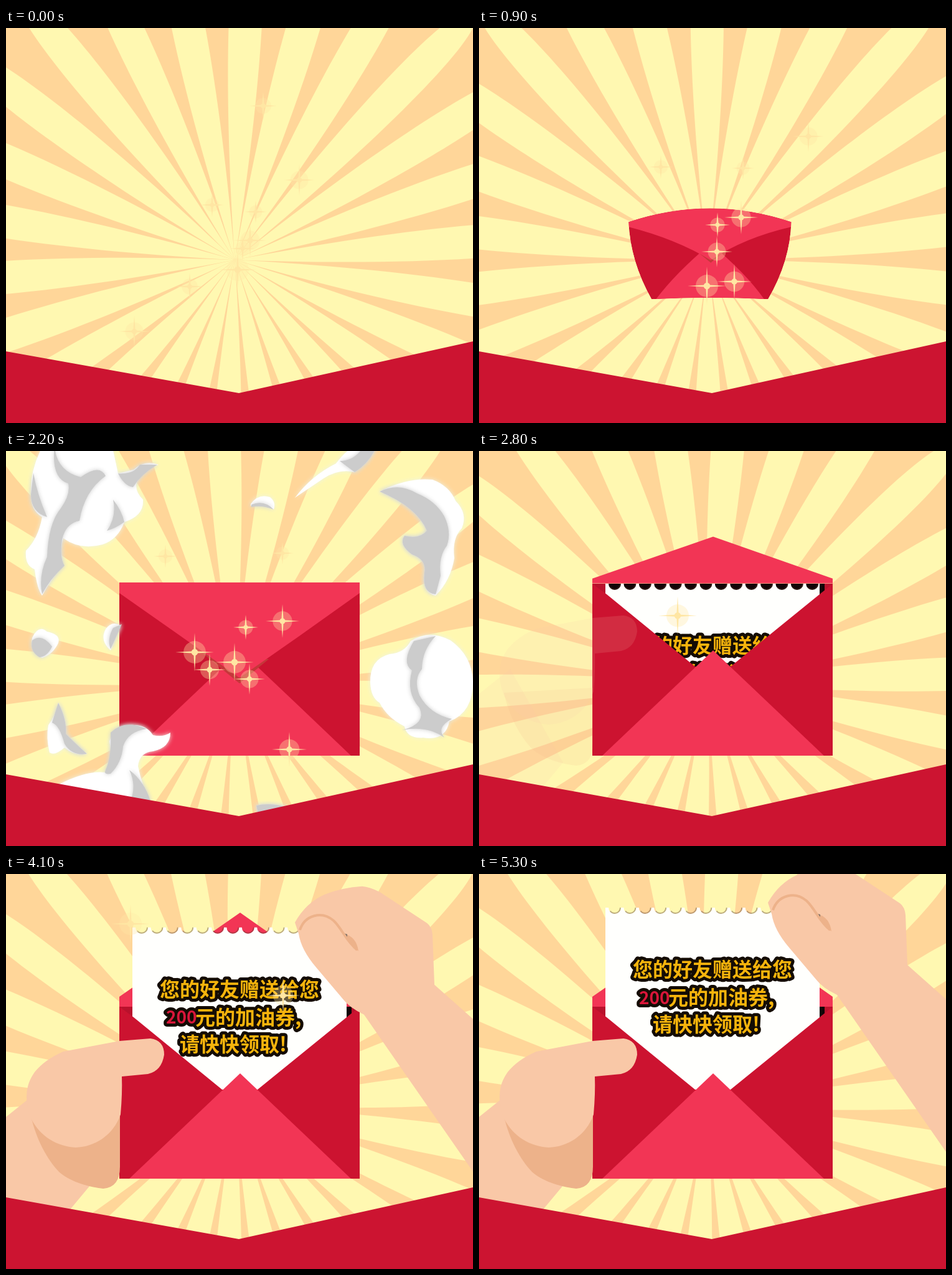
Recreate the animation shown at these times as an HTML page with a canvas. Size 750x634 px, loop 5.4 s.

```html
<!DOCTYPE html>
<html lang="zh">
<head>
<meta charset="utf-8">
<style>
  html, body { margin: 0; width: 100%; height: 100%; overflow: hidden; }
  canvas { display: block; }
</style>
</head>
<body>
<canvas id="stage" width="750" height="634"></canvas>
<script>
const ctx = document.getElementById('stage').getContext('2d');
const LOOP = 5.4, CX = 367.5, CY = 372.2;
const DARK = '#cc1330', LIGHT = '#f23555', SKIN = '#f9c8a7', SKIN_SHADE = '#edb28a', STAR = '#ffe6a3';

const clamp = v => Math.max(0, Math.min(1, v));
const ramp = (t, a, b) => clamp((t - a) / (b - a));
const mix = (a, b, k) => a + (b - a) * k;

function fill(path, color) {
  ctx.fillStyle = color;
  ctx.fill(typeof path === 'string' ? new Path2D(path) : path);
}

function drawRays(t) {
  ctx.fillStyle = '#ffd699';
  ctx.fillRect(0, 0, 750, 634);
  const petal = new Path2D('M0 0C30 -260 41 -560 0 -550C-41 -560 -30 -260 0 0Z');
  for (let i = 0; i < 26; i++) {
    ctx.save();
    ctx.translate(CX, CY);
    ctx.rotate((2.55 - 33.8 * t + i * 360 / 26) * Math.PI / 180);
    fill(petal, '#fff8b1');
    ctx.restore();
  }
}

// Envelope corners and curve handles: body, flap, lower triangle.
const BULGED = [78,243, 372,145, 666,243, 662,385, 582,522, 372,510, 161,522, 84,385,
  78,261, 250,305, 375,381, 495,300, 666,261,
  177,522, 250,425, 374,322, 500,425, 568,522];
const FLAT = [182,211, 375,211, 568,211, 568,350, 568,489, 375,489, 182,489, 182,350,
  182,228, 278,295, 375,364, 472,297, 568,228,
  198,489, 287,404, 376,320, 465,404, 554,489];

function drawClosedEnvelope(t) {
  const scale = ramp(t, 0.34, 1.6), flat = ramp(t, 1.7, 2);
  if (!scale) return;
  const v = BULGED.map((b, i) => mix(b, FLAT[i], flat));
  const p = i => v[2 * i] + ' ' + v[2 * i + 1];
  const q = (a, b) => `Q${p(a)} ${p(b)}`;
  ctx.save();
  ctx.translate(370, 366);
  ctx.scale(scale, scale);
  ctx.translate(-370, -366);
  const body = new Path2D(`M${p(0)}${q(1, 2)}${q(3, 4)}${q(5, 6)}${q(7, 0)}Z`);
  ctx.clip(body);
  fill(body, DARK);
  fill(`M${p(13)}${q(14, 15)}${q(16, 17)}Q${p(5)} ${p(13)}Z`, LIGHT);
  const tipY = v[21];
  fill(`M315 ${tipY - 40}L375 ${tipY + 9}L422 ${tipY - 30}Z`, '#c5373a');
  fill(`M${p(0)}${q(1, 2)}L${p(12)}${q(11, 10)}${q(9, 8)}Z`, LIGHT);
  ctx.restore();
}

function drawPaper(top) {
  const paper = new Path2D(), notches = new Path2D();
  paper.moveTo(203, 352);
  paper.lineTo(203, top);
  for (let i = 0; i < 14; i++) {
    const x = 218 + 24.4 * i;
    paper.arc(x, top, 10, Math.PI, 0, true);
    notches.moveTo(x + 9, top);
    notches.arc(x, top, 9, 0, Math.PI * 0.8);
  }
  paper.lineTo(547, top);
  paper.lineTo(547, 352);
  fill(paper, '#fffffd');
  ctx.strokeStyle = 'rgba(90,60,45,.4)';
  ctx.lineWidth = 2;
  ctx.stroke(notches);

  ctx.textBaseline = 'middle';
  ctx.lineJoin = 'round';
  ctx.lineWidth = 10;
  ctx.strokeStyle = '#140c04';
  const words = [
    ['您的好友赠送给您', 247, 99, 32, '#f6b40c'],
    ['200', 257, 144, 28, '#d9163a'],
    ['元的加油券,', 304, 144, 32, '#f6b40c'],
    ['请快快领取!', 279, 187, 32, '#f6b40c']
  ];
  for (const stroke of [true, false])
    for (const [text, x, y, size, color] of words) {
      ctx.font = `bold ${size}px "Noto Sans CJK SC", "Noto Sans CJK", sans-serif`;
      ctx.fillStyle = color;
      if (stroke) ctx.strokeText(text, x, top + y);
      else ctx.fillText(text, x, top + y);
    }
}

function drawOpenEnvelope(t, paperTop) {
  const open = ramp(t, 2.5, 2.9);
  const hinge = mix(211, 213, open), side = mix(228, 197, open), tip = mix(364, 62, open);
  const flap = `M182 ${hinge}V${side}L376 ${tip}L568 ${side}V${hinge}Z`;
  fill('M182 213H568V350H182Z', '#b9112c');
  fill('M203 213H555V350H203Z', '#120406');
  if (open > 0.5) fill(flap, LIGHT);
  drawPaper(paperTop);
  fill('M182 213L205 230L347 346H404L547 230L568 213V489H182Z', DARK);
  fill('M198 489L376 320L554 489Z', LIGHT);
  if (open <= 0.5) fill(flap, LIGHT);
}

function drawLeftHand(alpha) {
  ctx.globalAlpha = alpha;
  fill('M0 390L50 350L135 500L85 560H0Z', SKIN);
  fill('M40 388C48 425 66 458 85 478C105 496 138 503 156 505Q183 503 183 470V380Z', SKIN_SHADE);
  fill('M40 392C30 365 30 340 46 318Q62 298 92 285L182 268L232 264Q254 267 254 290Q250 316 228 321L186 325' +
    'Q187 352 184 386C172 420 142 438 112 439C82 437 55 422 40 392Z', SKIN);
  ctx.globalAlpha = 1;
}

function drawRightHand(alpha, dy) {
  ctx.save();
  ctx.globalAlpha = alpha;
  ctx.translate(0, dy);
  fill('M464 78Q482 46 512 33Q540 22 572 20Q584 21 600 29L676 79Q684 85 685 98L688 178L750 233V600' +
    'L750 478L575 226Q552 215 542 202L498 150Q474 122 470 96Z', SKIN);
  fill('M543 96Q563 101 566 124Q552 116 543 96Z', SKIN_SHADE);
  fill('M541 95L548 97V103Z', '#807066');
  ctx.strokeStyle = SKIN_SHADE;
  ctx.lineWidth = 4;
  ctx.stroke(new Path2D('M472 90C480 66 507 59 526 75C540 88 546 108 564 122'));
  ctx.restore();
}

// Smoke pieces: white outline, then gray shading.
const SMOKE = [
  ['M60 -10Q38 30 40 70Q40 96 58 106Q52 140 32 160Q30 184 46 190Q50 222 58 232Q72 206 92 184Q86 158 92 140Q120 160 155 150' +
   'Q180 142 190 114Q222 104 220 78Q206 64 210 50Q226 28 245 22Q222 14 205 30L180 36L170 -10Z',
   'M78 -10Q80 32 120 42Q150 20 160 40Q126 64 118 112Q96 116 90 142Q86 172 94 184Q70 206 58 230Q52 200 66 170Q68 116 88 92' +
   'Q104 70 100 52Q72 44 78 -10ZM172 78Q186 96 190 114Q176 124 162 128Q178 106 172 78ZM180 36Q205 38 215 22L243 22Q218 36 204 58Q190 56 180 36ZM44 35Q50 70 66 106Q40 98 40 70Z'],
  ['M464 75Q490 40 530 20Q545 0 560 -8H595Q585 18 560 34Q535 28 510 44Z', 'M536 16Q560 16 575 -8H595Q585 18 560 34Z'],
  ['M393 85Q405 68 424 74Q434 82 430 94Q415 84 393 88Z', 'M394 86Q415 78 430 94Q410 86 394 90Z'],
  ['M600 65Q645 42 685 46Q712 56 722 80Q742 100 732 124Q716 140 720 172Q714 208 690 232Q668 228 672 196Q676 174 652 166Q630 150 640 136Q664 142 676 128Q660 90 600 65Z',
   'M600 65Q630 50 660 68Q690 80 704 105Q716 130 708 152Q694 170 698 200L690 230Q668 228 672 196Q676 174 652 166Q630 150 640 136Q664 142 676 128Q660 90 600 65Z'],
  ['M585 372Q584 334 616 326Q640 324 650 305Q680 286 714 304Q748 328 750 370Q750 420 712 434Q706 466 670 460Q644 462 640 442Q612 428 600 404Q586 396 585 372Z',
   'M655 305L690 297Q668 320 668 350Q654 366 664 392Q680 422 716 430Q690 444 704 460Q676 440 636 448Q676 438 664 412Q642 388 652 352Q634 340 655 305Z'],
  ['M42 300Q52 278 66 290Q88 294 84 308Q76 326 58 332Q38 324 42 300Z', 'M42 304Q58 292 74 314Q66 330 54 331Q38 322 42 304Z'],
  ['M160 286Q170 272 184 280Q176 300 168 320Q150 304 160 286Z', 'M172 284L186 278Q176 300 168 318Q162 302 172 284Z'],
  ['M84 404Q98 432 96 454Q116 474 130 486Q110 490 94 476Q78 490 70 484Q64 460 68 440Q80 424 84 404Z', 'M84 404Q98 432 96 454Q116 474 130 486Q106 490 94 470Q86 440 74 436Z'],
  ['M85 535Q130 512 160 516Q172 490 166 466Q176 438 206 440Q226 440 236 456Q252 460 264 452Q264 476 236 482Q214 484 212 506Q218 536 232 562H85Z',
   'M168 452Q190 430 226 446Q196 450 188 474Q186 500 168 518Q156 520 160 512Q170 490 168 452ZM198 512Q222 530 232 562H200Q210 536 198 512Z'],
  ['M402 569Q425 564 452 572L440 582H405Z', 'M402 569Q425 564 452 572L440 582H405Z']
];

function drawSmoke(t) {
  if (t < 1.75 || t > 2.65) return;
  const s = t < 2.2 ? mix(0.5, 1, Math.sqrt(ramp(t, 1.75, 2.2))) : mix(1, 1.2, ramp(t, 2.2, 2.65));
  ctx.save();
  ctx.globalAlpha = 1 - ramp(t, 2.25, 2.65);
  ctx.translate(CX, CY);
  ctx.scale(s, s);
  ctx.translate(-CX, -CY);
  ctx.shadowBlur = 7;
  for (const [outline, shade] of SMOKE) {
    ctx.shadowColor = '#eef4e8';
    fill(outline, '#fff');
    ctx.shadowColor = '#ccc';
    fill(shade, '#ccc');
  }
  ctx.restore();
}

// Sparkle tracks: arm length, index of first key time, then positions.
const KEY_TIMES = [0, 0.9, 1.6, 2.2, 3.3, 4.1];
const TRACKS = [
  [25, 0, 471,244, 529,174],
  [19, 0, 331,284, 292,223, 265,184, 256,169],
  [18, 0, 401,295, 424,225, 438,180, 444,164],
  [27, 0, 392,341, 421,304, 438,282, 444,273],
  [20, 0, 380,354, 383,316, 385,292, 385,283],
  [31, 0, 372,388, 366,414, 360,436],
  [22, 0, 413,125], [22, 0, 295,415], [25, 0, 206,487],
  [28, 1, 410,407, 443,459, 455,479],
  [25, 1, 382,359, 388,364, 391,366],
  [31, 2, 324,332, 303,323],
  [26, 2, 351,354, 327,351],
  [31, 3, 367,339, 279,202, 200,80],
  [28, 4, 413,274, 445,195],
  [26, 4, 186,268], [27, 4, 191,334], [31, 4, 406,378]
];

function drawSparkle(x, y, arm, alpha) {
  ctx.save();
  ctx.translate(x, y);
  ctx.globalAlpha = alpha * 0.34;
  const circle = r => { const c = new Path2D(); c.arc(0, 0, r, 0, 7); return c; };
  fill(circle(arm * 0.58), STAR);
  ctx.globalAlpha = alpha;
  fill(`M0 ${-arm}L1.8 0L0 ${arm}L-1.8 0ZM${-arm} 0L0 1.8L${arm} 0L0 -1.8Z`, STAR);
  fill(circle(arm * 0.17), STAR);
  ctx.restore();
}

function drawSparkles(t) {
  for (const [arm, first, ...xy] of TRACKS) {
    const last = first + xy.length / 2 - 1;
    const alpha = Math.min(ramp(t, KEY_TIMES[first] - 0.5, KEY_TIMES[first]),
      1 - ramp(t, KEY_TIMES[last], KEY_TIMES[last] + 0.5));
    if (!alpha) continue;
    let i = first;
    while (i < last - 1 && t > KEY_TIMES[i + 1]) i++;
    const k = last > first ? ramp(t, KEY_TIMES[i], KEY_TIMES[i + 1]) : 0;
    const a = 2 * (i - first), b = last > first ? a + 2 : a;
    drawSparkle(mix(xy[a], xy[b], k), mix(xy[a + 1], xy[b + 1], k), arm * mix(0.5, 1, alpha), alpha);
  }
}

function draw(t) {
  drawRays(t);
  const paperTop = mix(213, 54, ramp(t, 3.3, 4.3));
  if (t < 2.5) drawClosedEnvelope(t);
  else drawOpenEnvelope(t, paperTop);
  drawLeftHand(ramp(t, 2.75, 3.1));
  drawRightHand(ramp(t, 3, 3.5), paperTop - 86);
  drawSmoke(t);
  drawSparkles(t);
  fill('M0 519L374 586L750 503V634H0Z', '#cc1431');
}

const start = performance.now();
function tick() {
  const elapsed = (performance.now() - start) / 1000 % LOOP;
  draw(Math.floor(elapsed * 10) / 10);
  requestAnimationFrame(tick);
}
tick();
</script>
</body>
</html>
```
